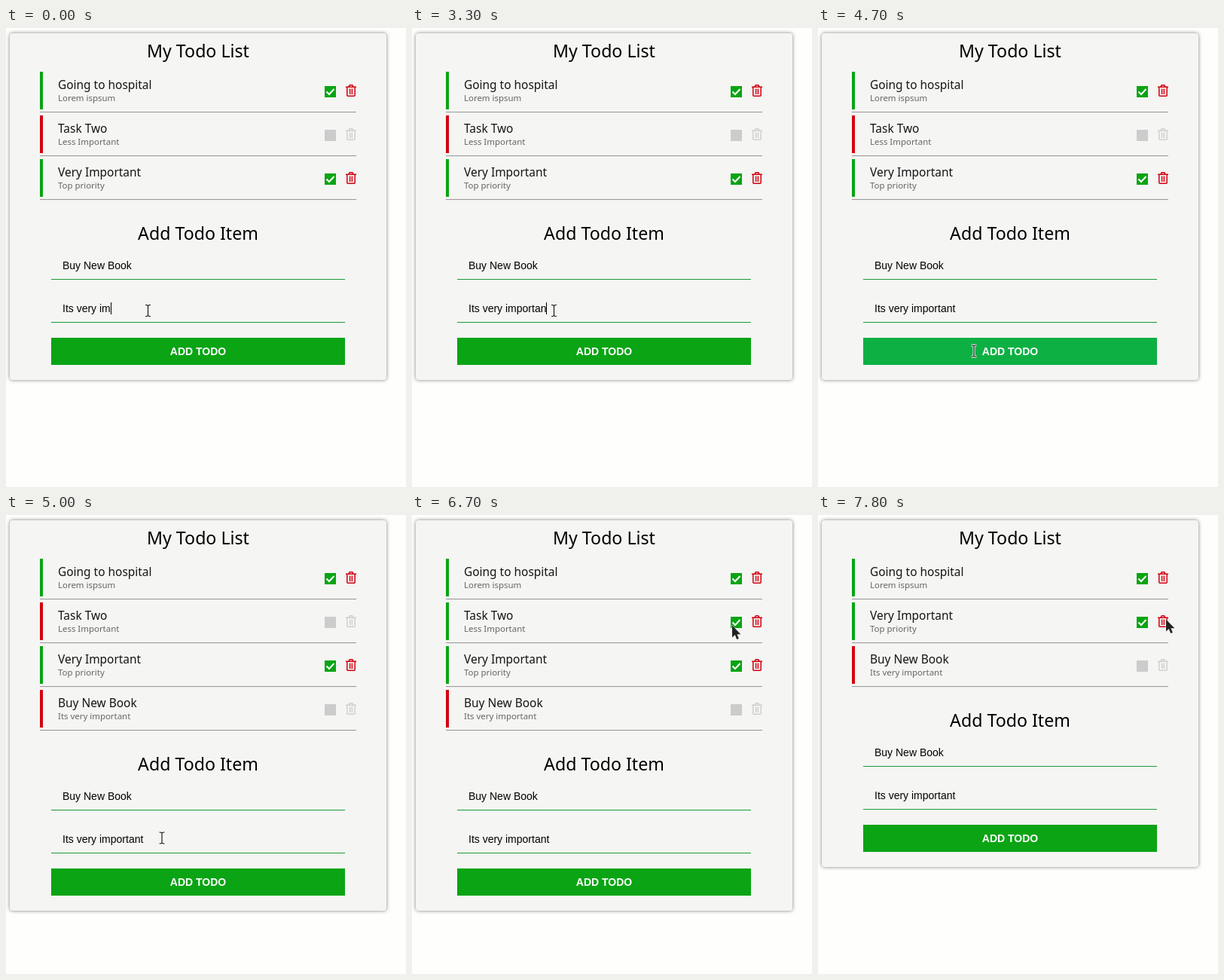
Recreate the animation shown at these times as an HTML page. Size 531 px wide and 609 px high, loop 8 s.

```html
<!DOCTYPE html>
<html lang="en">
<head>
<meta charset="utf-8">
<title>Todo list</title>
<style>
  html, body { margin: 0; width: 100%; height: 100%; overflow: hidden; background: #fefefd; }
  body { position: relative; }
  #card {
    position: absolute; left: 5px; top: 7px; width: 500px; height: 460px;
    background: #f5f5f3; border-radius: 4px; box-shadow: 0 0 5px rgba(0, 0, 0, .5);
  }
  svg { position: absolute; left: 0; top: 0; display: block; }
  rect { shape-rendering: crispEdges; }
  text { white-space: pre; }
  .head { font: 23.16px "Noto Sans", "Open Sans", sans-serif; text-anchor: middle; }
  .name { font: 15.44px "Noto Sans", "Open Sans", sans-serif; fill: #151515; }
  .note { font: 11.45px "Noto Sans", "Open Sans", sans-serif; fill: #666; }
  .input { font: 14px "Liberation Sans", Arial, sans-serif; }
  .label { font: bold 14px "Liberation Sans", Arial, sans-serif; fill: #fff; text-anchor: middle; }
  .bar { fill: #d0021b; fill: #d2000f; }
  .box { fill: #ccc; }
  .tick { fill: none; stroke: #fff; stroke-width: 2; visibility: hidden; }
  .bin { fill: none; stroke: #d0d0d0; stroke-width: 1.5; }
  .done .bar, .done .box { fill: #0aa414; }
  .done .tick { visibility: inherit; }
  .done .bin { stroke: #d2000f; }
  .line { fill: #1b9a35; }
</style>
</head>
<body>
<div id="card"></div>
<svg width="531" height="609" viewBox="0 0 531 609">
  <defs>
    <path id="bin" d="M0 3.3H14M4 3 5.2 .8H8.8L10 3M1.8 3.5V14.2Q1.8 15.2 2.8 15.2H11.2Q12.2 15.2 12.2 14.2V3.5M5.6 5.6V13M8.4 5.6V13"/>
    <path id="stem" d="M-3.5 -7.5H-1.5L0 -6.5L1.5 -7.5H3.5M0 -6.5V6.5M-3.5 7.5H-1.5L0 6.5L1.5 7.5H3.5"/>
  </defs>
  <text class="head" x="255" y="39">My Todo List</text>
  <g id="list"></g>
  <g id="form">
    <text class="head" x="255" y="281">Add Todo Item</text>
    <text class="input" x="75" y="320">Buy New Book</text>
    <rect class="line" x="60" y="333" width="390" height="1"/>
    <text class="input" id="typed" x="75" y="377"></text>
    <rect id="caret" y="364" width="1" height="16"/>
    <rect class="line" x="60" y="390" width="390" height="1"/>
    <rect id="button" x="60" y="411" width="390" height="36"/>
    <text class="label" x="255" y="434">ADD TODO</text>
  </g>
  <g id="beam" fill="none">
    <use href="#stem" stroke="#fff" stroke-width="3"/>
    <use href="#stem" stroke="#111" stroke-width="1.2"/>
  </g>
  <path id="arrow" d="M0 0V16L3.7 12.6L6.2 18.6L8.9 17.5L6.4 11.7H11.3Z"
        fill="#222" stroke="#fff" stroke-width="1" paint-order="stroke"/>
</svg>
<script>
const LOOP = 8000, ROW = 58;
const ADDED = 5000, CHECKED = 6700, REMOVED = 7700;
const NOTE = "Its very important";
const $ = id => document.getElementById(id);

// name, note, done from, shown from, shown until
const todos = [
  ["Going to hospital", "Lorem ispsum", 0, 0, LOOP],
  ["Task Two", "Less Important", CHECKED, 0, REMOVED],
  ["Very Important", "Top priority", 0, 0, LOOP],
  ["Buy New Book", NOTE, LOOP, ADDED, LOOP]
];

// time, letters typed, caret on
const typing = [
  [0, 11, 1], [100, 11, 0], [700, 11, 1], [1000, 9, 1], [1300, 9, 0],
  [1500, 10, 1], [1700, 11, 1], [1900, 12, 1], [2100, 13, 1], [2300, 14, 1],
  [2800, 15, 1], [3100, 16, 1], [3300, 17, 1], [4000, 18, 1], [4100, 18, 0]
];

// time, x, y, pointer shape
const pointer = [
  [0, 188.5, 375, "beam"], [4300, 217, 427, "arrow"], [4500, 205, 428, "arrow"],
  [4700, 207, 428.5, "beam"], [5700, 214, 424, "arrow"], [5800, 230, 413, "arrow"],
  [5900, 252, 396, "arrow"], [6000, 277, 375, "arrow"], [6100, 320, 320, "arrow"],
  [6200, 370, 245, "arrow"], [6300, 412, 178, "arrow"], [6400, 430, 143.5, "arrow"],
  [6700, 425, 146.5, "arrow"], [6900, 438, 143.5, "arrow"], [7000, 450.5, 149.5, "arrow"],
  [7200, 465, 149.5, "arrow"], [7300, 466, 146, "arrow"], [7400, 464, 141, "arrow"],
  [7500, 462, 138.5, "arrow"]
];

const rows = todos.map(([name, note]) => {
  const g = document.createElementNS("http://www.w3.org/2000/svg", "g");
  g.innerHTML = `
    <rect class="bar" x="45" y="58" width="4" height="50"/>
    <text class="name" x="69" y="81">${name}</text>
    <text class="note" x="69" y="97">${note}</text>
    <rect class="box" x="423" y="77" width="15" height="15"/>
    <path class="tick" d="M425.5 84.5 429 88 435.5 81"/>
    <use class="bin" href="#bin" x="451" y="75"/>
    <rect x="45" y="111" width="420" height="1" fill="#9a9a9a"/>
    <rect x="45" y="112" width="420" height="1" fill="#eee"/>`;
  $("list").append(g);
  return g;
});

const pen = document.createElement("canvas").getContext("2d");
pen.font = '14px "Liberation Sans", Arial, sans-serif';

const stepAt = (steps, t) => steps.findLast(s => s[0] <= t);
const move = (el, x, y) => el.setAttribute("transform", `translate(${x} ${y})`);
const show = (el, on) => el.setAttribute("visibility", on ? "visible" : "hidden");

function render(t) {
  let count = 0;
  todos.forEach(([, , done, from, until], i) => {
    const on = t >= from && t < until;
    show(rows[i], on);
    rows[i].setAttribute("class", t >= done ? "done" : "");
    move(rows[i], 0, count * ROW);
    if (on) count++;
  });

  const shift = (count - 3) * ROW;
  $("card").style.height = 460 + shift + "px";
  move($("form"), 0, shift);

  const [, letters, caret] = stepAt(typing, t);
  const text = NOTE.slice(0, letters);
  $("typed").textContent = text;
  $("caret").setAttribute("x", Math.round(75 + pen.measureText(text).width));
  show($("caret"), caret);
  $("button").setAttribute("fill", t >= 4300 && t < ADDED ? "#0db043" : "#0aa414");

  const [, x, y, shape] = stepAt(pointer, t);
  for (const id of ["beam", "arrow"]) {
    show($(id), id === shape);
    move($(id), x, y);
  }
}

const start = performance.now();
function tick() {
  render((performance.now() - start) % LOOP);
  requestAnimationFrame(tick);
}
tick();
</script>
</body>
</html>
```
